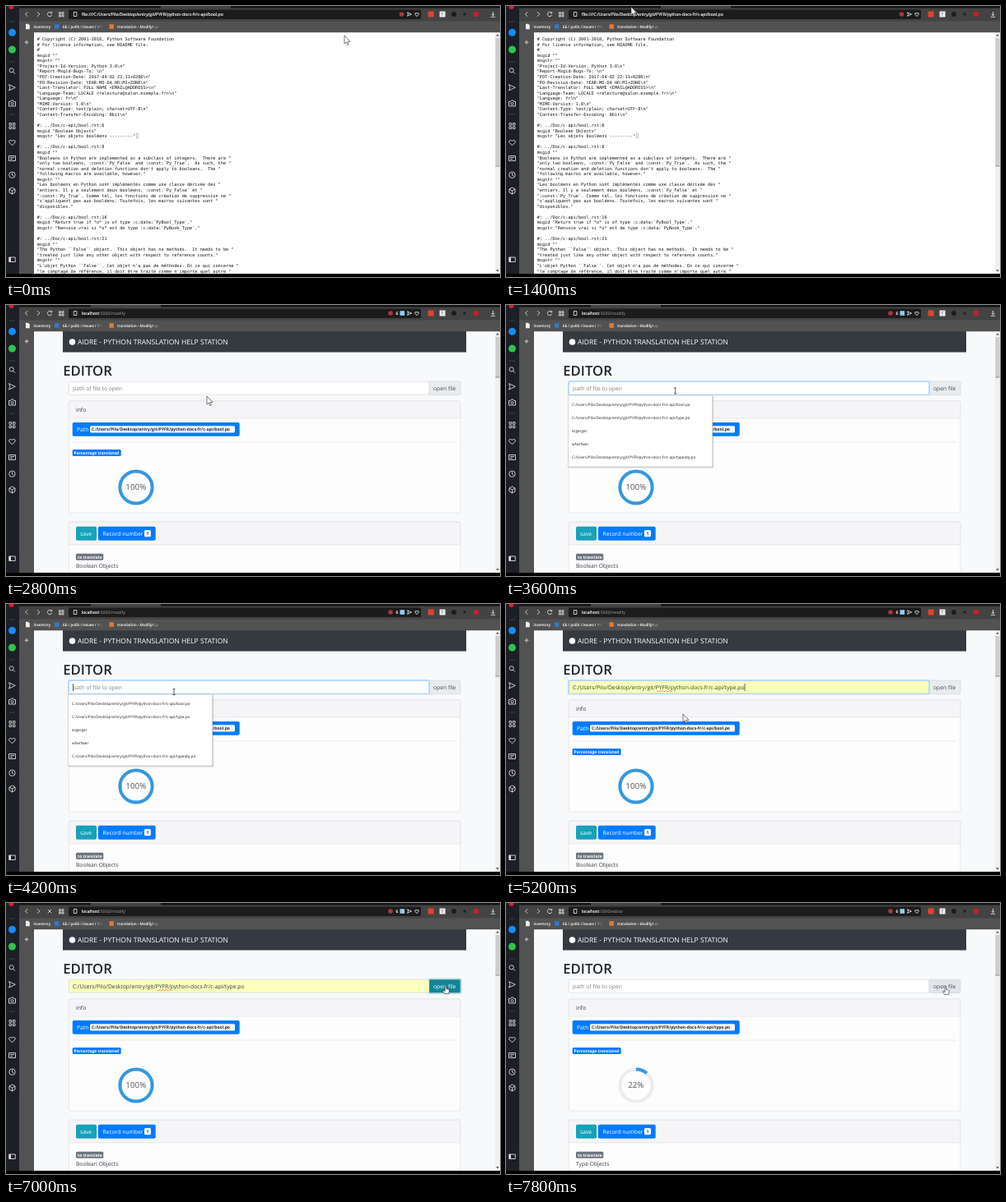
Recreate the animation shown at these times as an HTML page. Size 600 by 330 pixels, loop 8 s.

```html
<!DOCTYPE html>
<html lang="en">
<head>
<meta charset="utf-8">
<title>Translation editor</title>
<style>
html, body { margin: 0; width: 100%; height: 100%; overflow: hidden; background: #000; }
svg { display: block; width: 600px; height: 330px; }
text { font-family: "Open Sans", "Noto Sans", sans-serif; font-size: 6.75px; fill: #343a40; white-space: pre; text-rendering: geometricPrecision; }
.mono text { font-family: "DejaVu Sans Mono", monospace; font-size: 5.235px; fill: #111; }
.ui { font-size: 5.1px; fill: #fff; stroke: #fff; stroke-width: .15; }
.mark { font-size: 4.65px; fill: #fff; stroke: #fff; stroke-width: .12; }
.dim { fill: #a6a6a6; stroke: none; }
.badge { font-size: 5.05px; font-weight: 700; }
.item { font-size: 4.65px; fill: #222; }
.white { fill: #fff; }
.line { fill: none; stroke: #dcdcdc; stroke-width: .9; }
</style>
</head>
<body>
<svg viewBox="0 0 600 330">
  <rect width="600" height="330" fill="#0a0a0a"/>

  <g id="filePage" class="mono">
    <rect x="34" y="32" width="560" height="294" fill="#fff"/>
    <rect x="158.4" y="155" width="2" height="6" fill="none" stroke="#777" stroke-width=".4"/>
  </g>

  <g id="appPage">
    <rect x="34" y="32" width="560" height="294" fill="#f8f9fa"/>
    <rect x="69" y="32" width="490" height="25.5" fill="#343a40"/>
    <circle cx="80.5" cy="45" r="3.8" fill="#fff"/>
    <text x="87" y="48.2" class="white" style="font-size:8.57px">AIDRE - PYTHON TRANSLATION HELP STATION</text>
    <text x="69.3" y="85.5" style="font-size:16.7px;font-weight:600;fill:#212529">EDITOR</text>

    <rect id="buttonGlow" x="512.5" y="91.7" width="41" height="19" rx="2.5" fill="#a5d6de"/>
    <rect id="button" x="513.5" y="93" width="38.5" height="16.5" rx="1.8" stroke="#ced4da" stroke-width=".6"/>
    <text id="buttonText" x="519" y="103.7">open file</text>
    <rect id="glow" x="75" y="92" width="440" height="18.2" rx="2.5" fill="#bfdeff"/>
    <rect id="input" x="76.3" y="93.3" width="437.5" height="15.9" rx="1.5" stroke-width=".6"/>
    <text id="value" x="81" y="103.7"></text>
    <path id="squiggle" fill="none" stroke="#e33" stroke-width=".6"/>
    <path id="caret" stroke="#222" stroke-width=".7"/>

    <g fill="#fdfdfe" stroke="#dcdde0" stroke-width=".6">
      <rect x="76.3" y="117" width="475.5" height="136" rx="1.8"/>
      <rect x="76.3" y="117" width="475.5" height="21" rx="1.8" fill="#f5f5f7"/>
      <path d="M76.3 326V266q0-1.8 1.8-1.8H550q1.8 0 1.8 1.8V326"/>
      <path d="M76.3 292V266q0-1.8 1.8-1.8H550q1.8 0 1.8 1.8V292Z" fill="#f5f5f7"/>
      <path d="M81 167H547.5"/>
    </g>
    <text x="85" y="130">info</text>
    <rect x="80.7" y="143" width="203" height="16.7" rx="1.8" fill="#007bff"/>
    <text x="86" y="153.8" class="white">Path</text>
    <rect x="102" y="147.3" width="176" height="8.2" rx="1.5" fill="#f8f9fa"/>
    <text id="path" x="104" y="153.2" class="badge" style="fill:#212529"></text>
    <rect x="80.7" y="176" width="59" height="8" rx="1.5" fill="#007bff"/>
    <text x="82.6" y="181.8" class="badge white" style="font-size:4.95px">Percentage translated</text>
    <circle cx="158" cy="222" r="19.6" fill="none" stroke="#ebecef" stroke-width="4"/>
    <circle id="arc" cx="158" cy="222" r="19.6" fill="none" stroke="#3498e0" stroke-width="4" pathLength="100" transform="rotate(-90 158 222)"/>
    <text id="percent" x="157.8" y="225.3" text-anchor="middle" style="font-size:9.8px;fill:#555"></text>

    <rect x="85" y="269.7" width="25" height="17" rx="1.8" fill="#17a2b8"/>
    <text x="90" y="280.6" class="white">save</text>
    <rect x="112" y="269.7" width="69.7" height="17" rx="1.8" fill="#007bff"/>
    <text x="117.5" y="280.6" class="white">Record number</text>
    <rect x="168" y="274" width="8" height="8.2" rx="1.5" fill="#f8f9fa"/>
    <text x="172" y="280" text-anchor="middle" class="badge">1</text>
    <rect x="85" y="302.7" width="33.3" height="8" rx="1.5" fill="#6c757d"/>
    <text x="87" y="308.5" class="badge white">to translate</text>
    <text id="entry" x="85" y="319.5"></text>

    <g id="menu">
      <rect x="76.2" y="111" width="176" height="87.5" fill="#000" opacity=".15"/>
      <rect x="75.5" y="110" width="175.3" height="87" fill="#fff" stroke="#b8bcc0" stroke-width=".6"/>
      <rect id="hover" x="76" y="129" width="174.3" height="16" fill="#dfe3e8"/>
    </g>
  </g>

  <rect x="594" y="32" width="6" height="294" fill="#f0f0f0"/>
  <rect id="thumb" x="594.5" y="39" width="5" fill="#cdcdcd"/>
  <path id="thumbEnd" stroke="#777" stroke-width=".8"/>
  <path d="M595.2 36.5H598.8L597 34.3ZM595.2 321.3H598.8L597 323.5Z" fill="#444"/>

  <!-- browser frame -->
  <rect width="600" height="3" fill="#141414"/>
  <rect id="tab" y="0" width="85" height="3" fill="#434343"/>
  <rect x="15" y="2.5" width="585" height="16.5" fill="#434343"/>
  <rect x="76" y="4.5" width="428" height="11.5" rx="1.5" fill="#1c1c1c"/>
  <rect x="15" y="18.5" width="585" height="13.7" fill="#525252"/>
  <rect x="15" y="32" width="19" height="294" fill="#525252"/>
  <rect width="16" height="326" fill="#1c1f25"/>
  <rect y="326" width="600" height="4" fill="#000"/>
  <path d="M4 19H11M4 68H11M4 132H11" stroke="#555" stroke-width=".6"/>
  <g class="line">
    <path d="M26.3 7.2 23.5 10 26.3 12.8M38 7.2 40.8 10 38 12.8"/>
    <path id="reload" d="M55.3 8.4A2.7 2.7 0 1 0 55.7 10.8M55.7 7V8.8H53.8"/>
    <path id="stop" d="M50.8 7.8 55.2 12.2M55.2 7.8 50.8 12.2"/>
    <path d="M64.5 7.7h2v2h-2zM68 7.7h2v2h-2zM64.5 11h2v2h-2zM68 11h2v2h-2zM82.3 7.5h3.6v5h-3.6z"/>
    <path d="M487.5 7.8 492.5 10 487.5 12.3 488.5 10Z"/>
    <path d="M499 12.7 496.6 10Q496.4 7.8 499 8.8 501.6 7.8 501.4 10Z"/>
    <path d="M591.5 7V11.7M589.5 9.8 591.5 11.8 593.5 9.8M588.8 13.3H594.2M25 41.8V46.6M22.6 44.2H27.4"/>
    <circle cx="6.7" cy="78.3" r="2.6"/><path d="M8.6 80.2 11 82.6"/>
    <path d="M3.6 95.7 11.3 99.3 3.6 103 5 99.3Z"/>
    <path d="M3.5 116.5H5.4L6.3 115H8.8L9.7 116.5H11.5V122H3.5Z"/><circle cx="7.5" cy="119" r="1.5"/>
    <path d="M4 142.6h2.6v2.6H4zM8.4 142.6H11v2.6H8.4zM4 147h2.6v2.6H4zM8.4 147H11v2.6H8.4z"/>
    <path d="M7.5 169.8 3.8 166Q3.2 162.2 7.5 164.2 11.8 162.2 11.2 166Z"/>
    <path d="M3.5 182.5H11.5V188.5H3.5ZM5 184.5H10M5 186.5H8"/>
    <circle cx="7.5" cy="205.7" r="3.7"/><path d="M7.5 203.3V206L9.3 207"/>
    <path d="M7.5 221 11 223V227L7.5 229 4 227V223ZM4 223 7.5 225 11 223M7.5 225V229"/>
    <path d="M3.7 306H11.3V311.5H3.7Z"/><path d="M5 306V311.5" stroke-width="2"/>
  </g>
  <circle cx="6.5" cy="1" r="3" fill="#d6202f"/>
  <circle cx="7.5" cy="32.3" r="4.5" fill="#168aff"/>
  <circle cx="7.5" cy="53" r="4.5" fill="#2fc351"/>
  <g id="appIcons">
    <text x="473.6" y="12" class="ui">6</text>
    <rect x="478.5" y="7.2" width="5.6" height="5.6" fill="#8ed0ee"/>
  </g>
  <circle id="shield" cy="10" r="2.8" fill="#a8373b"/>
  <rect x="512.6" y="6.5" width="7" height="7" fill="#e0442e"/>
  <rect x="526.6" y="6.5" width="7" height="7" fill="#eee"/>
  <text x="528.6" y="12" class="ui" style="fill:#333;stroke:none">T</text>
  <circle cx="544" cy="10" r="3" fill="#1c1c1c"/>
  <circle cx="557" cy="10" r="1.8" fill="#222"/>
  <circle cx="571" cy="10" r="3.3" fill="#c0222b"/>
  <text x="92" y="12" class="ui"><tspan id="host"></tspan><tspan id="route" class="dim"></tspan></text>
  <path d="M24 21.8H27L28.8 23.6V28.2H24Z" fill="#eee"/>
  <rect x="59" y="22.3" width="5.4" height="5.4" fill="#3477cf"/>
  <rect x="125.5" y="22.2" width="5.4" height="5.6" fill="#df7a32"/>
  <text x="33.5" y="26.8" class="mark">inventory</text>
  <text x="69" y="26.8" class="mark">66 / polib / issues / <tspan class="dim">#1</tspan></text>
  <text x="135.3" y="26.8" class="mark">translation - Modify/<tspan class="dim">up</tspan></text>

  <g id="pointer">
    <path id="arrow" d="M0 0V10L2.3 8 3.8 11.5 5.3 10.8 3.8 7.4H7Z" fill="#fff" stroke="#222" stroke-width=".6"/>
    <path id="beam" d="M-1.6-3.5H1.6M0-3.5V3.5M-1.6 3.5H1.6" stroke="#222" stroke-width=".7"/>
    <path id="hand" d="M-.8 0Q0-.8.8 0V3.4L3.8 4.4Q4.6 4.7 4.4 5.8L3.6 9.5H-1.4L-3.6 6.1Q-3.4 5-2.2 5.6L-.8 6.5Z" fill="#fff" stroke="#222" stroke-width=".6"/>
  </g>
</svg>
<script>
const $ = id => document.getElementById(id);
const show = (id, on) => { $(id).style.display = on ? "" : "none"; };
const set = (id, attrs) => { for (const k in attrs) $(id).setAttribute(k, attrs[k]); };
const write = (id, s) => { $(id).textContent = s; };

const DIR = "C:/Users/Pilo/Desktop/entry/git/PYFR/python-docs-fr/c-api/";
const LOOP = 8000, STEP = 200;
const SWITCH = 1600, FOCUS = 3400, OPEN = 3600, PREVIEW = 4600, PICK = 5000, CLICK = 6400, LOAD = 7400;

const po = String.raw`# Copyright (C) 2001-2018, Python Software Foundation
# For licence information, see README file.
#
msgid ""
msgstr ""
"Project-Id-Version: Python 3.6\n"
"Report-Msgid-Bugs-To: \n"
"POT-Creation-Date: 2017-04-02 22:11+0200\n"
"PO-Revision-Date: YEAR-MO-DA HO:MI+ZONE\n"
"Last-Translator: FULL NAME <EMAIL@ADDRESS>\n"
"Language-Team: LOCALE <relecture@salon.exemple.fr>\n"
"Language: fr\n"
"MIME-Version: 1.0\n"
"Content-Type: text/plain; charset=UTF-8\n"
"Content-Transfer-Encoding: 8bit\n"

#: ../Doc/c-api/bool.rst:6
msgid "Boolean Objects"
msgstr "Les objets booléens ---------"

#: ../Doc/c-api/bool.rst:8
msgid ""
"Booleans in Python are implemented as a subclass of integers.  There are "
"only two booleans, :const:'Py_False' and :const:'Py_True'.  As such, the "
"normal creation and deletion functions don't apply to booleans.  The "
"following macros are available, however."
msgstr ""
"Les booléens en Python sont implémentés comme une classe dérivée des "
"entiers. Il y a seulement deux booléens, :const:'Py_False' et "
":const:'Py_True'. Comme tel, les fonctions de création de suppression ne "
"s'appliquent pas aux booléens. Toutefois, les macros suivantes sont "
"disponibles."

#: ../Doc/c-api/bool.rst:16
msgid "Return true if *o* is of type :c:data:'PyBool_Type'."
msgstr "Renvoie vrai si *o* est de type :c:data:'PyBook_Type'."

#: ../Doc/c-api/bool.rst:21
msgid ""
"The Python ''False'' object.  This object has no methods.  It needs to be "
"treated just like any other object with respect to reference counts."
msgstr ""
"L'objet Python ''False''. Cet objet n'a pas de méthodes. En ce qui concerne "
"le comptage de référence, il doit être traité comme n'importe quel autre "`
  .replace(/''False''|:'\w+'/g, m => m.replace(/'/g, "`"));

function addText(parent, x, y, s, cls) {
  const el = document.createElementNS($("menu").namespaceURI, "text");
  el.setAttribute("x", x);
  el.setAttribute("y", y);
  if (cls) el.setAttribute("class", cls);
  el.textContent = s;
  $(parent).appendChild(el);
}
po.split("\n").forEach((s, i) => addText("filePage", 37.7, 42 + i * 6.57, s));
[DIR + "bool.po", DIR + "type.po", "ergerger", "wfwrfwer", DIR + "typeobj.po"]
  .forEach((s, i) => addText("menu", 80, 122.7 + i * 16, s, "item"));

let wave = "M183 105.6";
for (let i = 0; i < 9; i++) wave += `l1 ${i % 2 ? -1 : 1}l1 0`;
set("squiggle", { d: wave });

// time, x, y of the pointer tip
const route = [
  [0, 411, 36], [1200, 158, 3], [1400, 152, 1], [1600, 152, 2],
  [2600, 246, 108], [2800, 244, 111], [3400, 206, 104], [4200, 204, 107],
  [4600, 212, 133], [5200, 215, 134], [5800, 540, 104], [6000, 534, 100], [8000, 534, 102]
];
function pointerAt(t) {
  const i = route.findIndex((k, n) => n && t < k[0]);
  const [a, b] = [route[i - 1], route[i]];
  const u = (t - a[0]) / (b[0] - a[0]), e = u * u * (3 - 2 * u);
  return [a[1] + (b[1] - a[1]) * e, a[2] + (b[2] - a[2]) * e];
}

function drawInput(t, overButton) {
  const focus = t >= FOCUS && t < CLICK;
  const filled = t >= PREVIEW && t < LOAD;
  show("glow", focus);
  set("input", { fill: filled ? "#faffbd" : "#fff", stroke: focus ? "#80bdff" : "#ced4da" });
  write("value", filled ? DIR + "type.po" : "path of file to open");
  $("value").style.fill = filled ? "#343a40" : "#7a828a";
  show("squiggle", filled && t >= PICK);
  show("caret", focus && t < 6200 && t % 1000 < 500);
  const end = filled ? 81.5 + $("value").getComputedTextLength() : 81.5;
  set("caret", { d: `M${end} 97V106` });
  show("menu", t >= OPEN && t < PICK);
  show("hover", t >= PREVIEW);
  const active = overButton && t < LOAD;
  show("buttonGlow", t >= CLICK && t < LOAD);
  set("button", { fill: active ? "#138496" : overButton ? "#e2e5e9" : "#e9ecef" });
  $("buttonText").style.fill = active ? "#fff" : "#495057";
}

function draw(t) {
  const app = t >= SWITCH, loaded = t >= LOAD;
  const [x, y] = pointerAt(t);
  const inRow = app && y >= 93 && y <= 109.5;
  const overButton = inRow && x >= 514 && x <= 552;
  const overInput = inRow && x >= 76 && x < 514;

  show("filePage", !app);
  show("appPage", app);
  show("appIcons", app);
  set("shield", { cx: app ? 467 : 480.5 });
  set("tab", { x: app ? 103 : 188 });
  const thumb = app ? 49 : 156;
  set("thumb", { height: thumb });
  set("thumbEnd", { d: `M594.5 ${39 + thumb}h5` });
  write("host", app ? "localhost" : "file:///" + DIR + "bool.po");
  write("route", app ? ":5000/" + (loaded ? "editor" : "modify") : "");
  const loading = t >= CLICK && t < 7600;
  show("reload", !loading);
  show("stop", loading);

  drawInput(t, overButton);
  write("path", DIR + (loaded ? "type.po" : "bool.po"));
  write("percent", loaded ? "22%" : "100%");
  write("entry", loaded ? "Type Objects" : "Boolean Objects");
  const arc = loaded ? Math.min(22, (t - LOAD) / 400 * 11.5) : 100;
  set("arc", { "stroke-dasharray": `${arc} ${arc < 100 ? 100 : 0}` });
  show("arc", arc > 0);

  set("pointer", { transform: `translate(${x} ${y})` });
  show("arrow", !overButton && !overInput);
  show("beam", overInput);
  show("hand", overButton);
}

const start = performance.now();
function tick() {
  const t = (performance.now() - start) % LOOP;
  draw(Math.floor(t / STEP) * STEP);
  requestAnimationFrame(tick);
}
tick();
</script>
</body>
</html>
```
